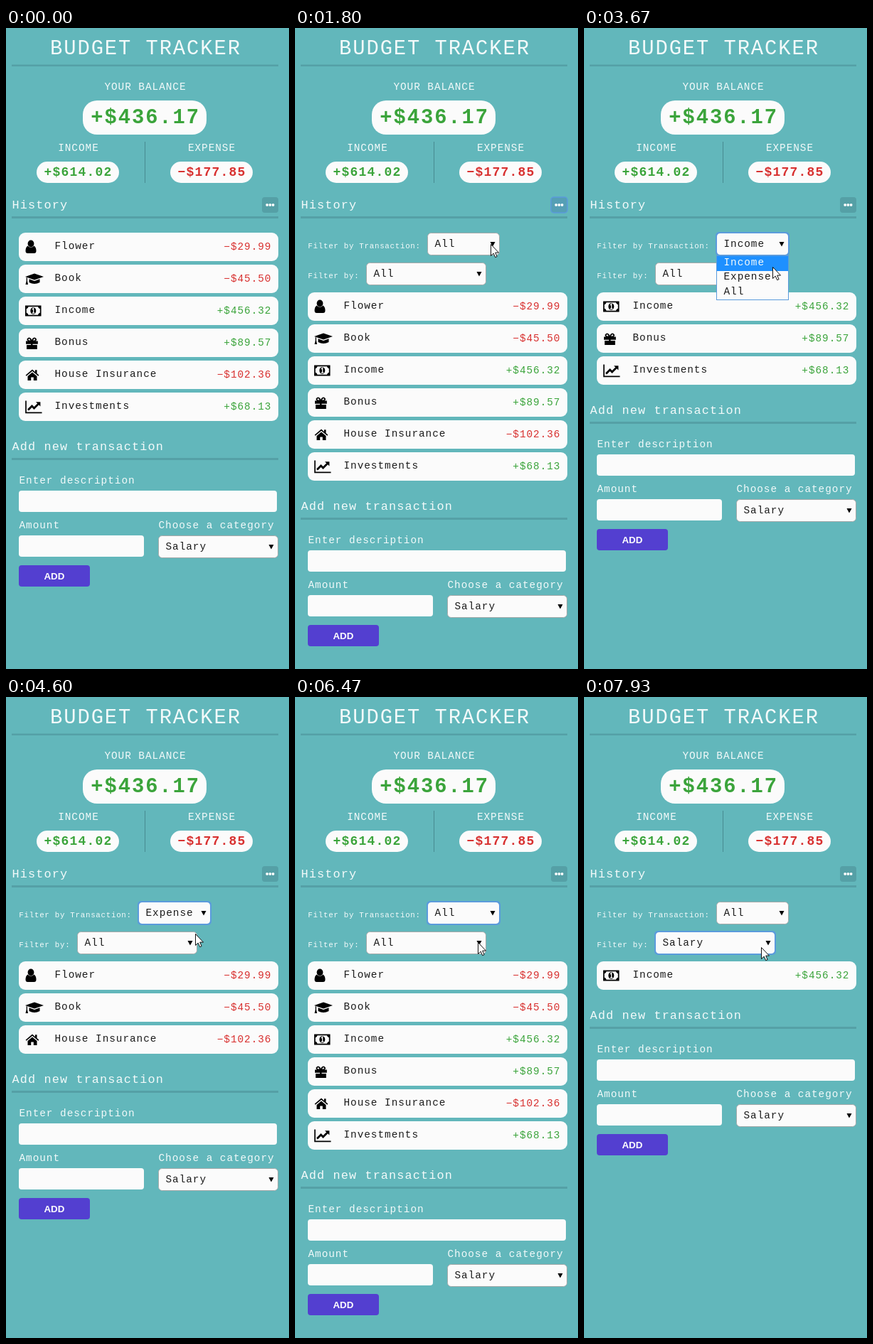
Write an HTML page that moves like this. It is 398 px wide and 902 px high and loops after 8000 ms.

```html
<!DOCTYPE html>
<html lang="en">
<head>
<meta charset="utf-8">
<title>Budget tracker</title>
<style>
  html, body { margin: 0; width: 100%; height: 100%; overflow: hidden; background: #62b7bb; }
  svg { display: block; }
  /* Small letters on a wide pitch, like a typewriter face */
  text { font: 14.4px "Liberation Mono", monospace; letter-spacing: .0667em; fill: #1c1c1c; white-space: pre; }
  .light { fill: #f3fafa; }
  .title { font-size: 28.8px; }
  .heading { font-size: 16.85px; }
  .small { font-size: 10.8px; }
  .bold { font-weight: 700; }
  .total { font-size: 28.8px; font-weight: 700; }
  .sub { font-size: 18px; font-weight: 700; }
  .plus { fill: #3ba43b; }
  .minus { fill: #d8302f; }
  .button { font: 700 13.33px "Liberation Sans", sans-serif; letter-spacing: 0; fill: #fff; }
  .mid { text-anchor: middle; }
  .end { text-anchor: end; }
</style>
</head>
<body>
<svg width="398" height="902" viewBox="0 0 398 902">
  <g id="page"></g>
  <path id="cursor" d="M0 0V16L3.7 12.6 6.2 18.2 8.6 17.1 6.2 11.6H11Z" fill="#fff" stroke="#111"/>
</svg>
<script>
const LOOP = 8000, PAPER = '#fbfbfb', SHADE = '#55a0a6', BLUE = '#5b9bdc';

const icons = {
  person: '<ellipse cx="35" cy="15.5" rx="4.4" ry="5"/><path d="M30.5 18.5Q35 23 39.5 18.5Q42.5 20.5 42.5 25.5Q42.5 29 39.5 29H30.5Q27.5 29 27.5 25.5Q27.5 20.5 30.5 18.5Z"/>',
  cap: '<path d="M27 17L40 12.5 53 17 40 21.5ZM32.5 20.3L40 23 47.5 20.3V25Q40 29 32.5 25ZM28.7 18L30 18.5V23L31 28H27.5L28.7 23Z"/>',
  cash: '<path fill-rule="evenodd" d="M27 12.5H49.5V27.5H27ZM31.5 14.2Q31 16.8 28.7 17.2V22.8Q31 23.2 31.5 25.8H45Q45.5 23.2 47.8 22.8V17.2Q45.5 16.8 45 14.2Z"/><ellipse cx="38.3" cy="20" rx="4" ry="4.8"/><path d="M36.8 18L38.6 16.5V23M36.6 23.2H40.5" fill="none" stroke="#fbfbfb" stroke-width="1.3"/>',
  gift: '<path d="M28 17.5H35V21.8H28ZM37.5 17.5H44.8V21.8H37.5ZM29 23H35V29H29ZM37.5 23H43.8V29H37.5ZM35 17.5H37.5V29H35Z"/><path d="M36 17.5H32.5Q30 17 30.5 14.8Q32.5 12 34.5 14.5ZM36.5 17.5H40Q42.5 17 42 14.8Q40 12 38 14.5Z" fill="none" stroke="#000" stroke-width="1.8"/>',
  house: '<path d="M27.6 20.6L37 12.5 41 16V13.3H43.5V18L46.4 20.6 45.3 21.8 37 14.8 28.7 21.8Z"/><path d="M30.5 22L37 16.5 43.5 22V28H38.8V23.5H35.2V28H30.5Z"/>',
  chart: '<path d="M28 11.5V28.3H50.5" fill="none" stroke="#000" stroke-width="1.7"/><path d="M31 24.5L36.5 19 39.5 22 45.5 16" fill="none" stroke="#000" stroke-width="2.8"/><path d="M42 13.2H48.4V19.6Z"/>'
};

const entries = [
  ['person', 'Flower', '−$29.99'],
  ['cap', 'Book', '−$45.50'],
  ['cash', 'Income', '+$456.32'],
  ['gift', 'Bonus', '+$89.57'],
  ['house', 'House Insurance', '−$102.36'],
  ['chart', 'Investments', '+$68.13']
];

const menus = {
  kind: { x: 186, y: 320, w: 102, items: ['Income', 'Expense', 'All'] },
  category: {
    x: 100, y: 362, w: 169, nested: true,
    items: ['All', 'Income', 'Salary', 'Investment', 'Bonus', 'Expense', 'House', 'Personal', 'Education']
  }
};
const ITEM = 20.25;

// Each step overrides part of the state from its time on.
const steps = [
  [0, { open: false, kind: 'All', category: 'All', focus: '', menu: '' }],
  [1200, { open: true, focus: 'toggle' }],
  [1930, { focus: 'kind', menu: 'kind' }],
  [2540, { kind: 'Income', menu: '' }],
  [3400, { menu: 'kind' }],
  [4130, { kind: 'Expense', menu: '' }],
  [5300, { menu: 'kind' }],
  [6000, { kind: 'All', menu: '' }],
  [6780, { focus: 'category', menu: 'category' }],
  [7530, { category: 'Salary', menu: '' }]
];

// Pointer path: time, x, y
const path = [
  [870, 371, 256], [1100, 369, 247], [1300, 369, 247], [1720, 276, 303],
  [1800, 275, 304], [1930, 275, 304], [2250, 256, 345], [2450, 252, 330],
  [2540, 252, 330], [2670, 259, 332], [2900, 270, 338], [3250, 275, 304],
  [3400, 275, 304], [3800, 262, 346], [4130, 262, 348], [4600, 266, 333],
  [5150, 275, 305], [5300, 275, 305], [5750, 251, 364], [5870, 250, 366],
  [6000, 250, 366], [6550, 257, 344], [6780, 257, 344], [7250, 228, 404],
  [7400, 226, 406], [7530, 226, 406], [7850, 249, 352], [8000, 249, 352]
];

const text = (x, y, s, cls = '') => `<text x="${x}" y="${y}" dx=".033em" class="${cls}">${s}</text>`;
const rect = (x, y, w, h, r = 0, fill = PAPER, extra = '') =>
  `<rect x="${x}" y="${y}" width="${w}" height="${h}" rx="${r}" fill="${fill}" ${extra}/>`;
const rule = (y, h = 3) => rect(8, y, 375, h, 0, SHADE);
const sign = amount => amount[0] === '+' ? 'plus' : 'minus';

function select(x, y, w, value, focused) {
  const ring = focused ? rect(x, y, w, 32, 4, 'none', `stroke="${BLUE}" stroke-width="2"`) : '';
  const border = `stroke="${focused ? BLUE : '#a5a9a9'}"`;
  return rect(x + .5, y + .5, w - 1, 31, 5, PAPER, border) + ring +
    text(x + 10, y + 20, value) +
    `<path d="M${x + w - 13.5} ${y + 13}h7l-3.5 6.5z"/>`;
}

function header(focused) {
  const ring = focused ? `stroke="${BLUE}" stroke-width="1.5"` : '';
  return text(195.5, 37, 'BUDGET TRACKER', 'light title mid') + rule(51.5, 2.5) +
    text(195.5, 87, 'YOUR BALANCE', 'light mid') +
    rect(108, 102, 174, 48, 20) + text(195.2, 134, '+$436.17', 'total plus mid') +
    text(101.5, 173, 'INCOME', 'light mid') + text(289, 173, 'EXPENSE', 'light mid') +
    rect(195, 160, 1, 58, 0, '#478b91') +
    rect(43, 188, 116, 30, 15) + text(101, 208, '+$614.02', 'sub plus mid') +
    rect(231, 188, 116, 30, 15) + text(289, 208, '−$177.85', 'sub minus mid') +
    text(8, 254, 'History', 'light heading') + rule(265) +
    rect(360, 238, 23, 22, 4, focused ? '#559fb5' : SHADE, ring) +
    [365.5, 369.7, 373.9].map(x => rect(x, 247.3, 3.4, 3.4, 1, '#fff')).join('');
}

const filters = s =>
  text(18, 310, 'Filter by Transaction:', 'light small') + select(186, 288, 102, s.kind, s.focus === 'kind') +
  text(18, 352, 'Filter by:', 'light small') + select(100, 330, 169, s.category, s.focus === 'category');

const row = ([icon, name, amount], y) =>
  `<g transform="translate(0 ${y})">${rect(18, 0, 365, 40, 9)}${icons[icon]}` +
  text(68, 23, name) + text(373, 24, amount, 'end ' + sign(amount)) + '</g>';

const form = y => `<g transform="translate(0 ${y})">` +
  text(8, 36, 'Add new transaction', 'light heading') + rule(47) +
  text(18, 83, 'Enter description', 'light') + rect(18, 93, 363, 30, 4) +
  text(18, 146, 'Amount', 'light') + rect(18, 156, 176, 30, 4) +
  text(214, 146, 'Choose a category', 'light') + select(214, 156, 169, 'Salary') +
  rect(18, 198, 100, 30, 4, '#533fd0') + text(67.5, 218, 'ADD', 'button mid') + '</g>';

function popup({ x, y, w, items, nested }, active) {
  const body = items.map((item, i) => {
    const group = nested && (i === 1 || i === 5);
    const indent = !nested || !i ? 10 : group ? 12 : 49;
    const top = Math.round(y + 1 + i * ITEM);
    const mark = i === active ? rect(x + 1, top, w - 2, 21, 0, '#1e90ff') : '';
    return mark + text(x + indent, top + 13, item, group ? 'bold' : i === active ? 'light' : '');
  }).join('');
  const height = Math.round(items.length * ITEM + 1);
  return rect(x + .5, y + .5, w - 1, height, 0, PAPER, `stroke="${BLUE}"`) + body;
}

function visible(s) {
  if (s.category === 'Salary') return entries.filter(e => e[0] === 'cash');
  const wanted = { Income: 'plus', Expense: 'minus' }[s.kind];
  return entries.filter(e => !wanted || sign(e[2]) === wanted);
}

function pointer(t) {
  const i = path.findIndex(p => p[0] > t);
  if (i < 1) return null;
  const [t0, x0, y0] = path[i - 1], [t1, x1, y1] = path[i];
  const u = (t - t0) / (t1 - t0), k = u * u * (3 - 2 * u);
  return [x0 + (x1 - x0) * k, y0 + (y1 - y0) * k];
}

function hovered(s, y) {
  const { y: top, items, nested } = menus[s.menu];
  const i = Math.floor((y - top) / ITEM);
  const blocked = i < 0 || i >= items.length || nested && (i === 1 || i === 5);
  return blocked ? items.indexOf(s[s.menu]) : i;
}

const page = document.getElementById('page'), cursor = document.getElementById('cursor');
let shown = '';

function draw(t) {
  const s = Object.assign({}, ...steps.filter(([at]) => at <= t).map(step => step[1]));
  const at = pointer(t);
  cursor.style.display = at ? '' : 'none';
  if (at) cursor.setAttribute('transform', `translate(${at.map(v => Math.round(v) + .5)})`);

  const active = s.menu ? hovered(s, at[1]) : -1;
  const key = JSON.stringify([s, active]);
  if (key === shown) return;
  shown = key;
  const list = visible(s), top = s.open ? 372 : 288;
  page.innerHTML = header(s.focus === 'toggle') + (s.open ? filters(s) : '') +
    list.map((entry, i) => row(entry, top + i * 45)).join('') +
    form(top + list.length * 45) +
    (s.menu ? popup(menus[s.menu], active) : '');
}

const start = performance.now();
function tick() {
  draw((performance.now() - start) % LOOP);
  requestAnimationFrame(tick);
}
tick();
</script>
</body>
</html>
```
